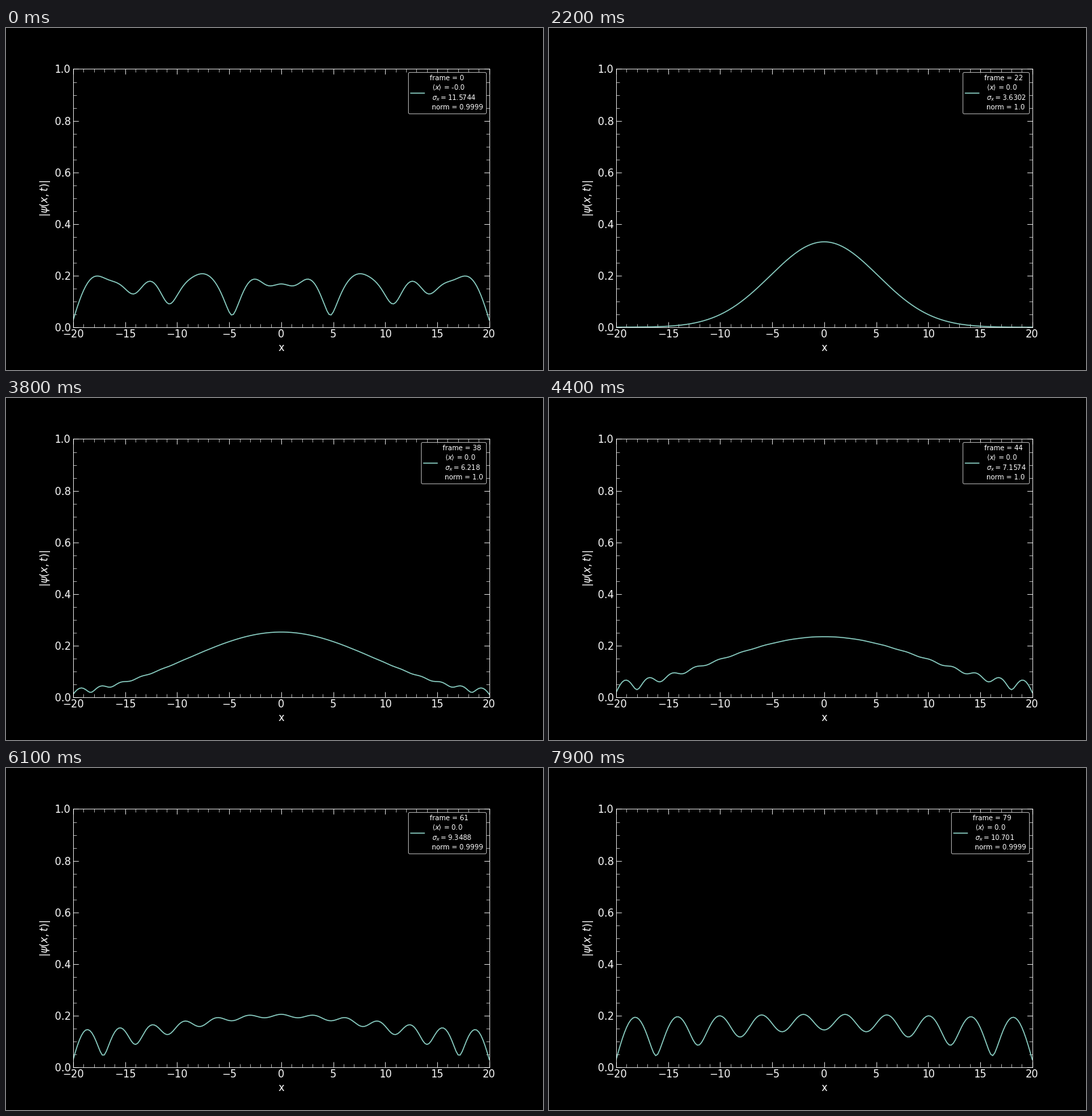
Animation, 792 px wide and 504 px high, one loop 8000 ms. Source, as a matplotlib script:

```python
import numpy as np
import matplotlib.pyplot as plt
from matplotlib.animation import FuncAnimation
from matplotlib.ticker import AutoMinorLocator

FRAMES, INTERVAL = 80, 100
STEPS, DT = 300, 0.33402          # stored states and time between them
POINTS, HALF = 201, 20.0

x = np.linspace(-HALF, HALF, POINTS)
dx = x[1] - x[0]

# Eigenmodes of the finite-difference box, walls one cell outside the grid
j = np.arange(1, POINTS + 1)
modes = np.sqrt(2 / (POINTS + 1)) * np.sin(np.pi * np.outer(j, j) / (POINTS + 1))
energy = (1 - np.cos(np.pi * j / (POINTS + 1))) / dx**2

# Gaussian packet at rest, unit spread
coeffs = modes @ ((2 * np.pi) ** -0.25 * np.exp(-x**2 / 4))

# Simpson weights
weights = np.where(np.arange(POINTS) % 2, 4.0, 2.0) * dx / 3
weights[[0, -1]] = dx / 3


def amplitude(step):
    phase = np.exp(-1j * energy * step * DT)
    return np.abs(modes @ (phase * coeffs))


def describe(n, amp):
    density = weights * amp**2
    norm = round(float(density.sum()), 4)
    sigma = round(float(np.sqrt((density * x**2).sum())), 4)
    mean = "-0.0" if n == 0 else "0.0"
    return (f"frame = {n}\n"
            rf" $\langle x \rangle$ = {mean}" "\n"
            rf" $\sigma_x = {sigma}$" "\n"
            f" norm = {norm}")


plt.style.use("dark_background")
plt.rcParams.update({"font.family": "DejaVu Sans", "font.size": 10})

fig, ax = plt.subplots(figsize=(11, 7), dpi=72)
fig.subplots_adjust(left=0.125, right=0.9, bottom=0.125, top=0.88)
ax.set_xlim(-HALF, HALF)
ax.set_ylim(0, 1)
ax.set_xlabel("x", fontsize=15)
ax.set_ylabel(r"$|\psi(x,t)|$", fontsize=15)
ax.xaxis.set_minor_locator(AutoMinorLocator(5))
ax.yaxis.set_minor_locator(AutoMinorLocator(4))
ax.tick_params(which="both", direction="in", top=True, right=True)
ax.tick_params(which="major", length=8, labelsize=15)
ax.tick_params(which="minor", length=5)
line, = ax.plot([], [], color="#8dd3c7", lw=1.5)


def update(n):
    # The first picture wraps round to the last stored state
    amp = amplitude((n - 1) % STEPS)
    line.set_data(x, amp)
    line.set_label(describe(n, amp))
    return line, ax.legend(loc="upper right")


anim = FuncAnimation(fig, update, frames=FRAMES, interval=INTERVAL,
                     init_func=lambda: update(0), repeat=True, repeat_delay=0)
plt.show()
```
